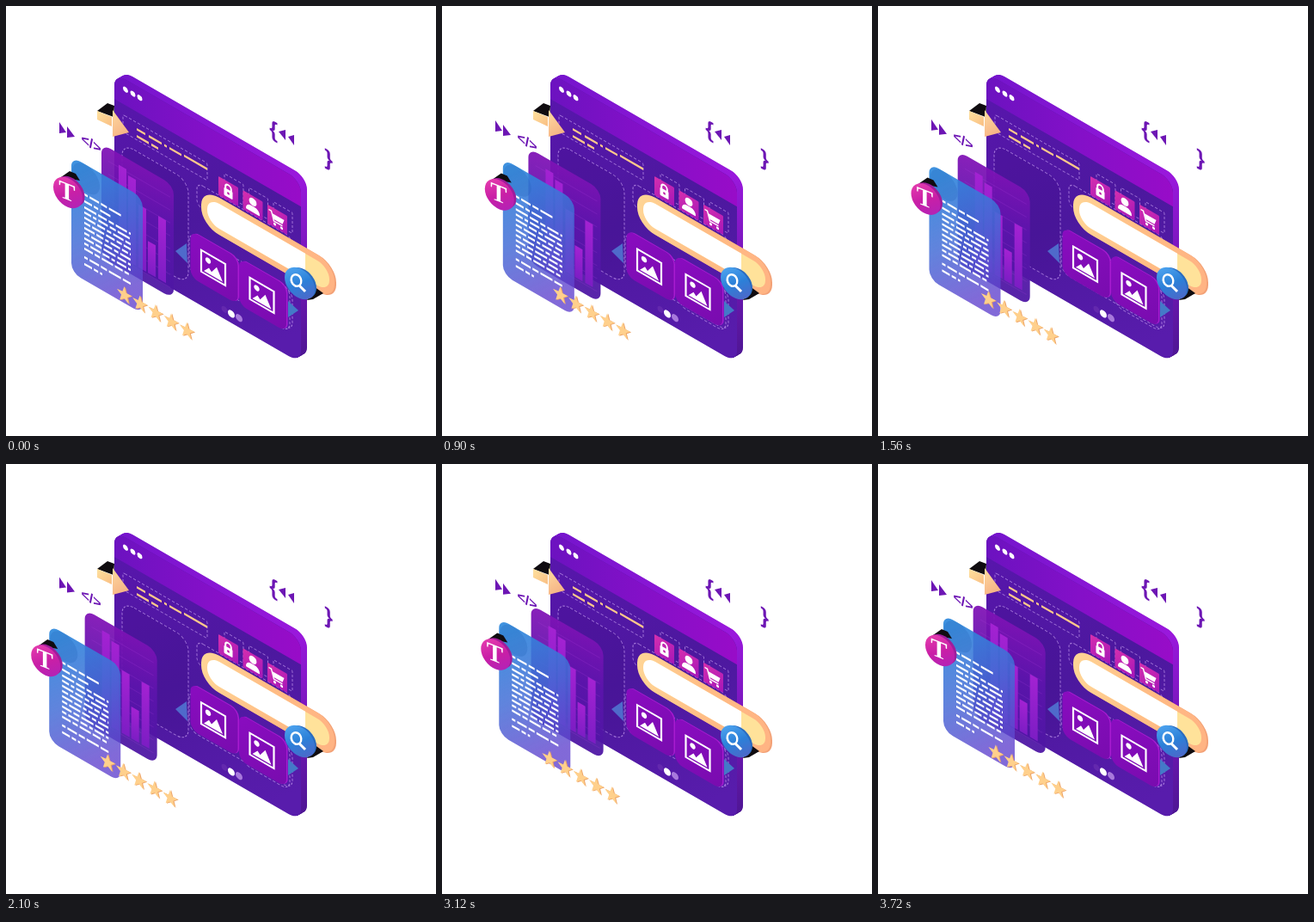
Animation of 500 by 500 pixels, one loop 3.75 s. Source, as an HTML page with a canvas:

```html
<!DOCTYPE html>
<html lang="en">
<head>
<meta charset="utf-8">
<style>
html, body { margin: 0; width: 100%; height: 100%; overflow: hidden; background: #fff; }
canvas { display: block; }
</style>
</head>
<body>
<canvas id="stage" width="500" height="500"></canvas>
<script>
const ctx = document.getElementById('stage').getContext('2d');
const LOOP = 3750, SLOPE = 0.577;
const PEACH = '#ffc98a';

// Linear rise from start to peak, then linear return to end
function ramp(t, start, peak, end) {
  if (t <= start || t >= end) return 0;
  return t < peak ? (t - start) / (peak - start) : (end - t) / (end - peak);
}

function gradient(x0, y0, x1, y1, ...colors) {
  const g = ctx.createLinearGradient(x0, y0, x1, y1);
  colors.forEach((c, i) => g.addColorStop(i / (colors.length - 1), c));
  return g;
}

// Draw in a wall-like plane whose horizontal lines descend to the right
function plane(x, y, draw, slope = SLOPE) {
  ctx.save();
  ctx.transform(1, slope, 0, 1, x, y);
  draw();
  ctx.restore();
}

function shift(x, y, draw) {
  ctx.save();
  ctx.translate(x, y);
  draw();
  ctx.restore();
}

function box(x, y, w, h, r, fill) {
  ctx.fillStyle = fill;
  ctx.beginPath();
  ctx.roundRect(x, y, w, h, r);
  ctx.fill();
}

function dashed(x, y, w, h, r) {
  ctx.strokeStyle = 'rgba(205,165,245,.65)';
  ctx.lineWidth = 1;
  ctx.setLineDash([3, 2]);
  ctx.beginPath();
  ctx.roundRect(x, y, w, h, r);
  ctx.stroke();
  ctx.setLineDash([]);
}

function poly(fill, ...points) {
  ctx.fillStyle = fill;
  ctx.beginPath();
  for (let i = 0; i < points.length; i += 2) ctx.lineTo(points[i], points[i + 1]);
  ctx.fill();
}

function disc(x, y, r, fill) {
  ctx.fillStyle = fill;
  ctx.beginPath();
  ctx.arc(x, y, r, 0, 7);
  ctx.fill();
}

function label(text, x, y, font, fill) {
  ctx.font = font;
  ctx.fillStyle = fill;
  ctx.textAlign = 'center';
  ctx.textBaseline = 'middle';
  ctx.fillText(text, x, y);
}

function lockIcon() {
  box(-5, -2, 10, 9, 1, '#fff');
  ctx.strokeStyle = '#fff';
  ctx.lineWidth = 2;
  ctx.beginPath();
  ctx.arc(0, -4, 3.3, Math.PI, 0);
  ctx.lineTo(3.3, -1);
  ctx.moveTo(-3.3, -4);
  ctx.lineTo(-3.3, -1);
  ctx.stroke();
  disc(0, 2.5, 1.4, '#c01fa8');
}

function userIcon() {
  disc(0, -4, 4.4, '#fff');
  box(-8, 1, 16, 7, [6, 6, 1, 1], '#fff');
}

function cartIcon() {
  ctx.strokeStyle = '#fff';
  ctx.lineWidth = 1.6;
  ctx.beginPath();
  for (const [x, y] of [[-10, -6], [-7, -6], [-4, 4], [6, 4]]) ctx.lineTo(x, y);
  ctx.stroke();
  poly('#fff', -6, -4, 8, -4, 6, 2, -4, 2);
  disc(-3, 7, 1.6, '#fff');
  disc(5, 7, 1.6, '#fff');
}

function drawWindow() {
  // Rim, from back to front
  for (let d = 7; d > 0; d -= 0.5) {
    plane(126 + d, 78 - d * 0.57, () =>
      box(0, 0, 217, 212, 14, gradient(0, 0, 217, 212, '#7414cc', '#9a18dc', '#4c1692')));
  }
  plane(126, 78, () => {
    box(0, 0, 217, 212, 14, gradient(0, 30, 180, 212, '#5816ac', '#4c189e', '#581cac'));
    box(0, 0, 217, 30, [14, 14, 0, 0], gradient(0, 0, 217, 0, '#6c12c0', '#8410c8', '#980cc8'));
    for (const x of [13, 21.5, 29.5]) disc(x, 11.7, 3, '#fff');

    dashed(10, 42.5, 98, 20, 2);
    for (const [x, y, w] of [[26, 49, 10], [40, 49, 15], [58, 49, 3], [64, 49, 14], [81, 48, 27],
      [26, 57, 14], [43, 57, 8]]) box(x, y, w, 2.6, 0, PEACH);

    box(9, 76, 77, 120, 14, 'rgba(55,12,125,.2)');
    dashed(9, 76, 77, 120, 14);
    dashed(96, 72, 110, 27, 7);
    [lockIcon, userIcon, cartIcon].forEach((icon, i) => {
      const x = 121 + i * 28.5;
      dashed(x + 7, 43, 22, 24, 1);
      box(x, 50, 23, 22, 1, gradient(x, 50, x + 23, 72, '#d62fae', '#a516b8'));
      shift(x + 11.5, 61, icon);
    });
    dashed(87, 134, 120, 47, 10);
    dashed(149, 132, 55, 52, 10);
    disc(128, 201, 3.5, 'rgba(130,70,190,.35)');
    disc(136, 201.5, 4, '#fff');
    disc(145, 201, 4, '#a879dc');
  });
  poly('#4f6acb', 197, 285, 210, 276, 211, 299);
  poly('#4479c8', 328, 343, 340, 354, 328, 362);
}

function drawArrow() {
  poly('#100c10', 106, 122, 118, 113, 126, 116, 125, 129);
  poly(gradient(106, 120, 124, 140, '#ffe3a0', '#f9bd82'), 106, 122, 123, 129, 123, 140, 106, 132);
  poly(gradient(122, 121, 140, 150, '#ffdca0', '#f5b184'), 124, 121, 143, 147, 124, 152);
}

function drawTile(x, y) {
  plane(x, y, () => {
    box(-26, -28, 55, 54, 9, '#a81ad0');
    box(-27.5, -27, 55, 54, 9, gradient(-27, -27, 27, 27, '#8a0cc0', '#780cae'));
    ctx.strokeStyle = '#fff';
    ctx.lineWidth = 2.2;
    ctx.strokeRect(-15, -11.5, 28, 25);
    disc(-7, -4, 3.2, '#fff');
    poly('#fff', -12, 11, -6, 4, -3, 7, 3, -2, 10, 11);
  });
}

function drawSearch() {
  plane(229, 212, () => box(0, 0, 155, 43, 20, '#f3a277'));
  plane(227, 211, () => {
    box(0, 0, 155, 43, 20, gradient(0, 0, 155, 0, '#ffd596', '#ffbd85', '#ffb383'));
    box(7, 7, 142, 29, 14, '#ffe29a');
    box(7, 7, 114, 29, [14, 0, 0, 14], '#fff');
  });
  poly('#100c10', 350, 342, 358, 326, 369, 334, 357, 341);
  plane(344, 322, () => disc(0, 0, 17, '#2a6cc0'), 0.35);
  plane(341.5, 322.5, () =>
    disc(0, 0, 17.5, gradient(-12, -15, 12, 15, '#4fa5f0', '#2c80d8', '#4f66c8')), 0.4);
  ctx.strokeStyle = '#fff';
  ctx.lineWidth = 2.4;
  ctx.beginPath();
  ctx.ellipse(337.5, 319, 5.6, 7, -0.4, 0, 7);
  ctx.stroke();
  ctx.lineWidth = 3;
  ctx.beginPath();
  ctx.moveTo(341, 325);
  ctx.lineTo(348, 332);
  ctx.stroke();
}

function drawGlyphs(lift) {
  const ink = '#6d16b4', brace = 'bold 25px "Liberation Sans", sans-serif';
  shift(0, -lift, () => {
    poly(ink, 62, 135, 70, 147, 62, 148);
    poly(ink, 71, 140, 80, 152, 71, 153);
    plane(99, 161, () => label('</>', 0, 0, 'bold 16px "Liberation Sans", sans-serif', ink));
  });
  plane(311, 145, () => label('{', 0, 0, brace, ink));
  poly(ink, 317, 146, 325, 144, 325, 156);
  poly(ink, 328, 152, 335, 150, 335, 162);
  plane(375, 179, () => label('}', 0, 0, brace, ink));
}

function drawChart(x, y) {
  plane(x, y, () => {
    box(0, 0, 84, 132, 11, gradient(0, 0, 30, 132, 'rgba(130,18,182,.94)', 'rgba(92,20,172,.94)', 'rgba(78,22,164,.94)'));
    ctx.strokeStyle = 'rgba(180,70,225,.2)';
    ctx.lineWidth = 1;
    for (let gy = 16; gy < 125; gy += 15) {
      ctx.beginPath();
      ctx.moveTo(8, gy);
      ctx.lineTo(80, gy);
      ctx.stroke();
    }
    for (const [bx, top] of [[20, 13], [31, 19], [43, 46], [54, 82], [66, 46]])
      box(bx, top, 9, 119 - top, 0, gradient(0, top, 0, 119, '#a322d2', '#7c1dc4'));
  });
}

function drawDocument(x, y) {
  plane(x, y, () => {
    box(0, 0, 83, 135, 11, gradient(0, 20, 83, 100, 'rgba(46,136,220,.92)', 'rgba(66,108,214,.84)', 'rgba(98,68,206,.8)'));
    disc(17, 16, 16, 'rgba(32,95,185,.25)');
    const rows = [34, 42, ...Array.from({ length: 9 }, (_, i) => 49 + i * 6), 107, 115];
    rows.forEach((ry, i) => {
      const end = i === 0 ? 58 : i === 1 ? 46 : i === 12 ? 36 : 69;
      let rx = 15;
      for (let j = 0; rx < end; j++) {
        const w = Math.min(4 + (i * 5 + j * 7) % 11, end - rx);
        box(rx, ry, w, 2.5, 0, '#fff');
        rx += w + 2.2;
      }
    });
  });
  shift(x - 4, y + 42, () => {
    poly('#100c10', -8, -18, 2, -25, 9, -22, 14, -14);
    plane(3, -1.5, () => disc(0, 0, 16.5, '#a01c9c'), 0.4);
    plane(0, 0, () => {
      disc(0, 0, 17, gradient(-10, -16, 12, 16, '#e63eae', '#c91fa6', '#b023b8'));
      label('T', -1, 1, 'bold 29px "Liberation Serif", serif', '#fff');
    }, 0.4);
  });
}

function drawStars(x, y) {
  for (let i = 0; i < 5; i++) {
    plane(x + i * 18.2, y + i * 10.4, () => {
      for (const [dx, fill] of [[1.2, '#eda468'], [0, '#ffd08c']]) {
        ctx.fillStyle = fill;
        ctx.beginPath();
        for (let p = 0; p < 10; p++) {
          const r = p % 2 ? 4 : 10, a = p * Math.PI / 5;
          ctx.lineTo(dx + Math.sin(a) * r * 0.9, -Math.cos(a) * r);
        }
        ctx.fill();
      }
    }, 0.5);
  }
}

function frame(now) {
  const t = now % LOOP;
  const chart = ramp(t, 0, 1875, LOOP);
  const doc = ramp(t, 600, 2115, 3720);
  const stars = ramp(t, 1075, 2455, LOOP);
  ctx.clearRect(0, 0, 500, 500);
  drawWindow();
  drawArrow();
  drawTile(242, 304 - 8 * ramp(t, 600, 2400, LOOP));
  drawTile(298.5, 336 - 6 * ramp(t, 0, 1400, 2800));
  drawSearch();
  drawGlyphs(4 * chart);
  drawChart(111 - 22 * chart, 160 + 10 * chart);
  drawDocument(76 - 26 * doc, 175 + 12 * doc);
  drawStars(137.5 - 26 * stars, 336 + 15 * stars);
  requestAnimationFrame(frame);
}
requestAnimationFrame(frame);
</script>
</body>
</html>
```
